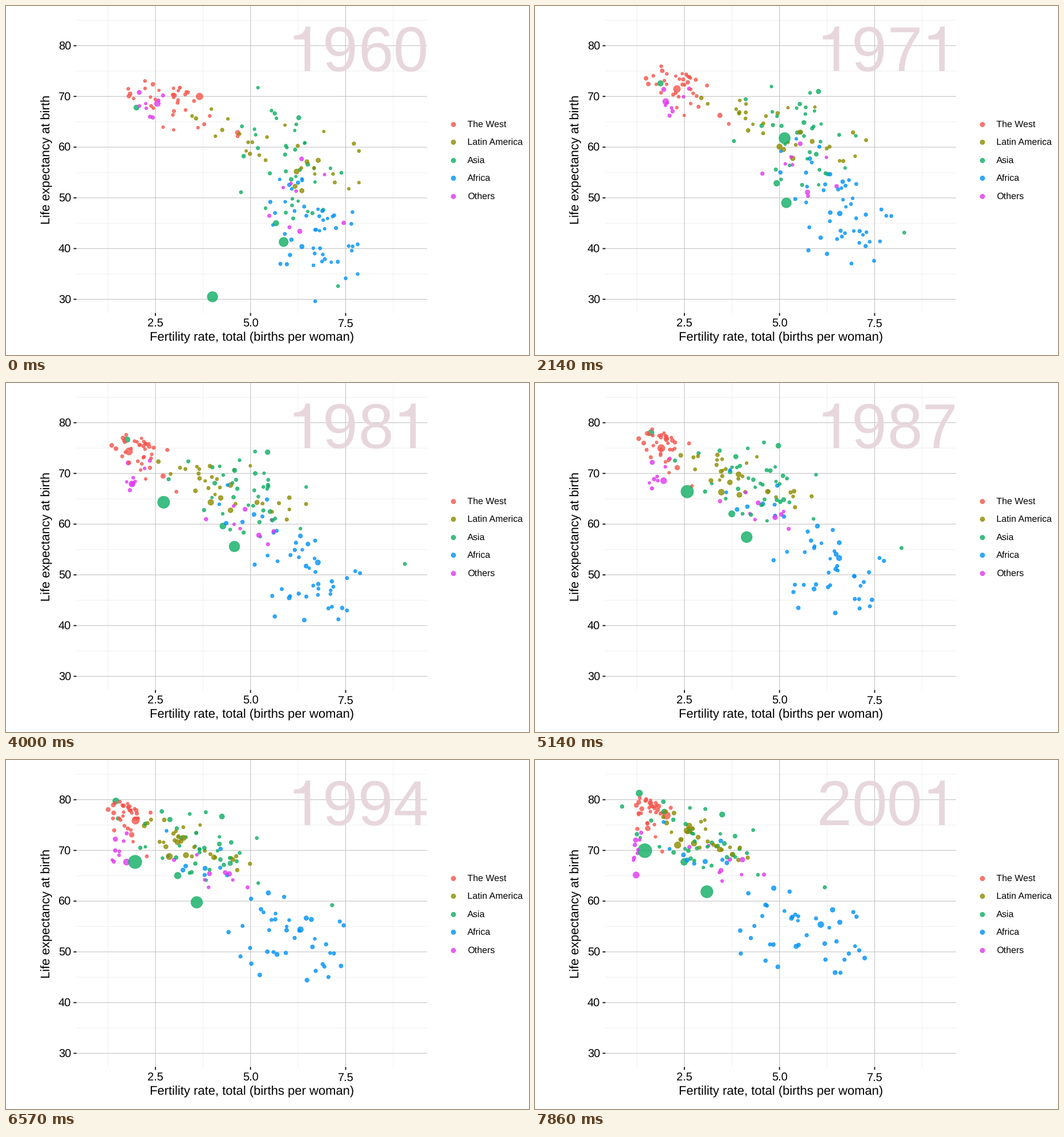
These frames come from a looping animation (917x611 px, 8 s). A matplotlib script:

```python
import numpy as np
import matplotlib
import matplotlib.pyplot as plt
from matplotlib.animation import FuncAnimation
from matplotlib.patches import Polygon

matplotlib.rcParams["font.family"] = "Liberation Sans"
matplotlib.rcParams["text.hinting"] = "none"

W, H, DPI = 917, 611, 100
PX = 72 / DPI  # points per pixel
LEFT, RIGHT, BOTTOM = 123, 738, 537

# The picture steps seven times a second; the timer runs on a finer grid.
FRAMES, INTERVAL, LEAD = 200, 40, 25
STEP_MS = 1000 / 7
START, SPAN = 1960, 41
YEARS_PER_STEP = 0.743

WEST, LATIN, ASIA, AFRICA, OTHERS = range(5)
GROUPS = ["The West", "Latin America", "Asia", "Africa", "Others"]
COLORS = np.array(["#f6564d", "#8c8c00", "#0eae63", "#0092f6", "#e037f2"])
GROWTH = [1.4, 2.4, 2.1, 2.8, 1.25]  # population factor over the whole span
ALPHA = 0.8

rng = np.random.default_rng(1965)
dots = []  # (group, population in millions, p -> fertility, life expectancy)


def to_x(fertility):
    return 261.5 + (fertility - 2.5) * 66.7


def to_y(life):
    return 69 + (80 - life) * 8.88


def path(group, pop, *points):
    """A large country moving through evenly timed (fertility, life) points."""
    ferts, lives = zip(*points)
    times = np.linspace(0, 1, len(points))
    dots.append((group, pop, lambda p: (np.interp(p, times, ferts),
                                        np.interp(p, times, lives))))


def cloud(group, count, start, end, tilt, delay=1.0):
    """Many small countries. start and end: fertility, life and their spreads.
    Life expectancy rises early; a larger delay makes fertility fall later."""
    start, end = np.array(start), np.array(end)

    def member():
        a, b, c, d = np.clip(rng.normal(size=4), -1.8, 1.8)
        phase = rng.uniform(0, 2 * np.pi)

        def at(p):
            fall, rise = p ** delay, 1 - (1 - p) ** 1.3
            fert, _, wide, _ = start + (end - start) * fall
            _, life, _, tall = start + (end - start) * rise
            turn = 1.2 * p
            u = a * np.cos(turn) + c * np.sin(turn)
            v = b * np.cos(turn) + d * np.sin(turn)
            v = v * np.sqrt(1 - tilt ** 2) - u * tilt
            return fert + wide * u, life + tall * v + 0.15 * np.sin(37 * p + phase)
        return at

    for _ in range(count):
        pop = np.clip(np.exp(rng.normal(1.8, 0.9)), 0.6, 45)
        dots.append((group, pop, member()))


path(ASIA, 660, (4, 30.5), (6.02, 54.2), (5.5, 61.5), (3.4, 63), (2.72, 64.2),
     (2.65, 66.2), (2.3, 67.2), (1.8, 68), (1.45, 70))
path(ASIA, 470, (5.87, 41.3), (4.6, 55.5), (3.08, 61.9))
path(ASIA, 95, (5.67, 45), (4.3, 59.5), (2.48, 67.8))
path(ASIA, 80, (2.0, 67.8), (1.76, 76.6), (1.31, 81.3))
path(WEST, 190, (3.66, 70), (2.35, 71.2), (1.8, 74.3), (1.95, 75.4), (2.03, 76.9))
path(OTHERS, 120, (2.55, 68.6), (2.02, 69.1), (1.88, 67.9), (2.0, 69), (1.22, 65.1))
path(LATIN, 73, (6.21, 55.2), (3.98, 64.2), (2.31, 71.1))
path(LATIN, 42, (6.78, 57.4), (4.5, 67.6), (2.61, 74.9))
path(AFRICA, 45, (6.35, 40.4), (6.78, 52.4), (6.08, 55.4))
path(AFRICA, 6, (6.7, 29.6), (7.05, 43.3), (6.82, 49.7))
path(ASIA, 6, (7.3, 32.6), (9.1, 52), (6.17, 62.8))

cloud(WEST, 27, (2.65, 70.3, .48, 1.5), (1.6, 78.8, .23, .9), tilt=.1, delay=.7)
cloud(WEST, 9, (3.4, 64, .7, 1.8), (1.6, 74, .3, 2), tilt=.4, delay=.7)
cloud(LATIN, 29, (5.6, 60, 1.25, 4.8), (2.75, 73, .6, 2.8), tilt=.65)
cloud(ASIA, 38, (6.1, 56, 1.0, 8), (2.8, 71.5, .9, 4.6), tilt=.6, delay=1.5)
cloud(AFRICA, 38, (6.7, 43, .62, 4.6), (5.5, 53.8, .95, 4), tilt=.3, delay=2.5)
cloud(AFRICA, 9, (6.6, 50, .6, 4), (2.8, 72, .5, 3), tilt=.4, delay=1.4)
cloud(OTHERS, 8, (2.5, 69, .33, 1.7), (1.25, 71.3, .07, 2.4), tilt=.1, delay=1.5)
cloud(OTHERS, 9, (6.2, 53.5, .8, 6), (3.6, 66.5, .65, 4), tilt=.4)

dots = [dots[i] for i in rng.permutation(len(dots))]
dot_colors = COLORS[[group for group, _, _ in dots]]


def state(year):
    p = (year - START) / SPAN
    fert, life = np.array([at(p) for _, _, at in dots]).T
    pop = np.array([n * GROWTH[g] ** p for g, n, _ in dots])
    return to_x(fert), to_y(life), 2.6 + 0.27 * np.sqrt(pop)


# ---- fixed parts --------------------------------------------------------

fig = plt.figure(figsize=(W / DPI, H / DPI), dpi=DPI, facecolor="white")
ax = fig.add_axes([0, 0, 1, 1])
# Whole numbers fall on pixel centres.
ax.set_xlim(-0.5, W - 0.5)
ax.set_ylim(H - 0.5, -0.5)
ax.axis("off")


def line(xs, ys, color, width, z):
    ax.plot(xs, ys, color=color, lw=width * PX, zorder=z,
            solid_capstyle="butt", snap=False)


def label(x, y, text, size, **kw):
    return ax.text(x, y, text, fontsize=size * PX, va="baseline", **kw)


def area(r):
    return (2 * (np.asarray(r) - 0.45) * PX) ** 2


def markers(xs, ys, radii, colors):
    return ax.scatter(xs, ys, s=area(radii), c=colors, alpha=ALPHA,
                      edgecolors=colors, linewidths=0.9 * PX, zorder=5)


def vertical(fert, color, z):
    line([to_x(fert)] * 2, [-1, BOTTOM], color, 1.07, z)


def horizontal(life, color, z):
    line([LEFT, RIGHT], [to_y(life)] * 2, color, 1.07, z)


MINOR, MAJOR, TICK = "#f0f0f0", "#c2c2c2", "#222222"
for fert in np.arange(1.25, 9, 2.5):
    vertical(fert, MINOR, 1)
for life in range(35, 90, 10):
    horizontal(life, MINOR, 1)
for fert in (2.5, 5.0, 7.5):
    vertical(fert, MAJOR, 2)
    x = to_x(fert)
    line([x, x], [BOTTOM, BOTTOM + 5], TICK, 2, 2)
    label(x, 561, f"{fert:.1f}", 20, ha="center")
for life in range(30, 90, 10):
    horizontal(life, MAJOR, 2)
    y = to_y(life)
    line([LEFT - 5, LEFT], [y, y], TICK, 2, 2)
    label(113.5, y + 7, str(life), 20, ha="right")

label(430.3, 586, "Fertility rate, total (births per woman)", 22, ha="center")
label(77, 268, "Life expectancy at birth", 22, ha="center",
      rotation=90, rotation_mode="anchor")

for i, name in enumerate(GROUPS):
    y = 206 + 31.5 * i
    markers([783.5], [y], [4.4], [COLORS[i]])
    label(808.7, y + 5.2, name, 16)


# ---- year counter -------------------------------------------------------

EM, YEAR_X, YEAR_Y, YEAR_COLOR = 111, 493, 113.5, "#e7d7dd"
# A figure one without a foot, in em units
ONE = np.array([(.359, 0), (.359, .703), (.29, .703), (.268, .64), (.225, .59),
                (.165, .567), (.101, .56), (.101, .499), (.27, .499), (.27, 0)])
digits, ones = [], []
for i in range(4):
    x = YEAR_X + i * 0.556 * EM
    digits.append(label(x, YEAR_Y, "", EM, color=YEAR_COLOR, zorder=3))
    shape = ONE * [EM, -EM] + [x, YEAR_Y]
    ones.append(ax.add_patch(Polygon(shape, fc=YEAR_COLOR, ec="none", zorder=3)))


# ---- motion -------------------------------------------------------------

points = markers(*state(START), dot_colors)


def update(frame):
    step = int((frame * INTERVAL + LEAD) / STEP_MS)
    year = START + step * YEARS_PER_STEP
    x, y, radii = state(year)
    points.set_offsets(np.column_stack([x, y]))
    points.set_sizes(area(radii))
    for char, text, one in zip(str(round(year)), digits, ones):
        text.set_text("" if char == "1" else char)
        one.set_visible(char == "1")
    return [points, *digits, *ones]


anim = FuncAnimation(fig, update, frames=FRAMES, interval=INTERVAL,
                     repeat=True, repeat_delay=0, blit=False)
plt.show()
```
